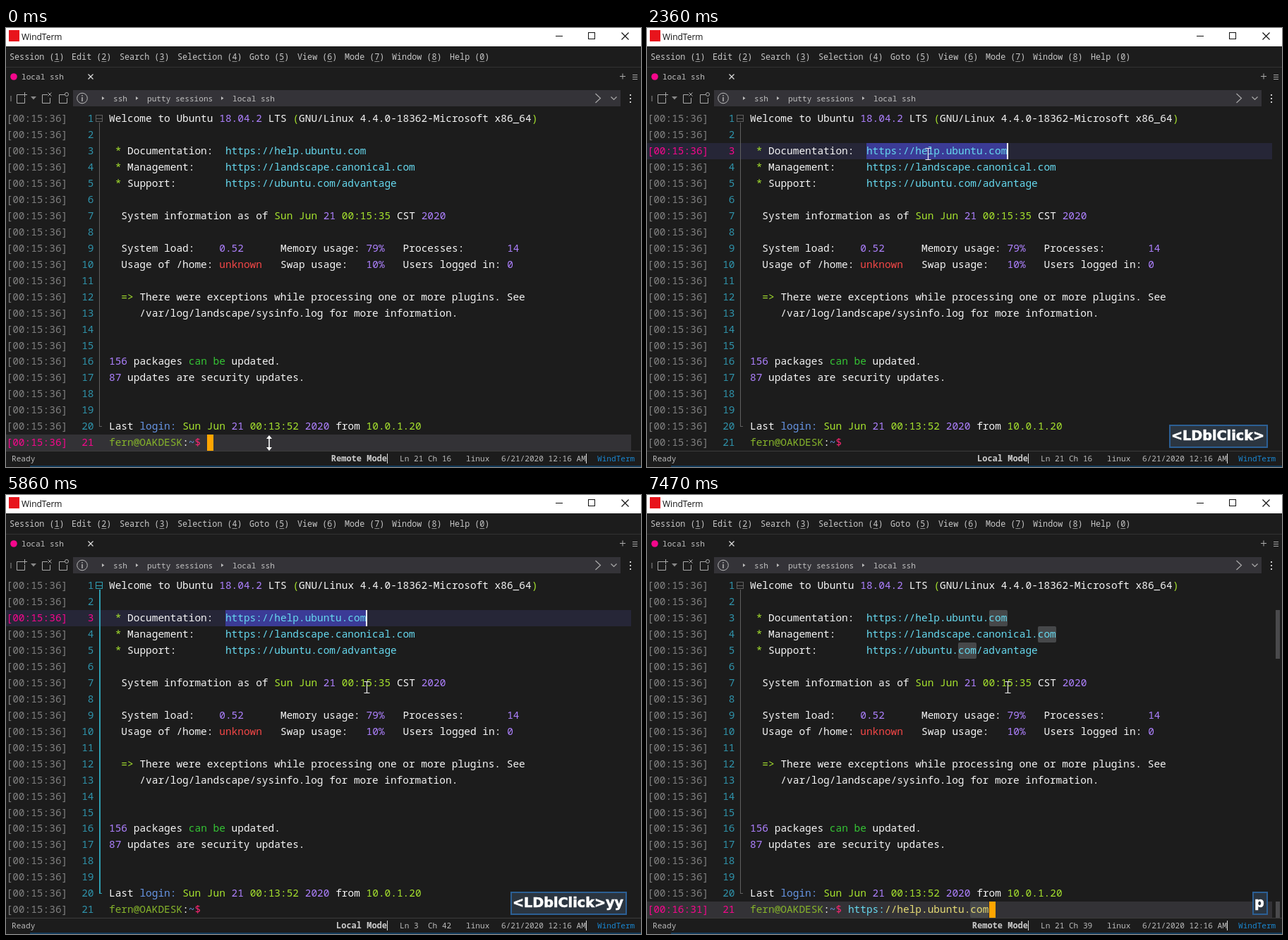
An HTML page with a canvas that plays this animation: 900 px wide and 622 px high, repeating every 8000 ms.

```html
<!DOCTYPE html>
<html lang="en">
<head>
<meta charset="utf-8">
<title>Terminal</title>
<style>
html, body { margin: 0; width: 100%; height: 100%; overflow: hidden; background: #1c1c1c; }
canvas { display: block; }
</style>
</head>
<body>
<canvas id="stage" width="900" height="622"></canvas>
<script>
const ctx = document.getElementById('stage').getContext('2d');
const LOOP = 8000, LEFT = 146, CELL = 8.68, PITCH = 22.94;
const MONO = '"Noto Sans Mono", monospace';
const TERM = `${CELL / 0.6}px ${MONO}`, SMALL = `11.1px ${MONO}`;
const COLORS = {
  w: '#f5f5f5', p: '#ae81ff', g: '#a6e22e', c: '#66d9ef', r: '#f44747',
  k: '#35c435', b: '#6796e6', u: '#86b42b', m: '#f92672', y: '#e6db74'
};
const ACTIVE = '#f5078c';

// {x...} colours a run with key x
const LINES = [
  'Welcome to Ubuntu {p18.04.2} LTS {g(}GNU/Linux 4.4.0-18362-Microsoft x86_64{g)}',
  '',
  ' {g*} Documentation:  {chttps://help.ubuntu.com}',
  ' {g*} Management:     {chttps://landscape.canonical.com}',
  ' {g*} Support:        {chttps://ubuntu.com/advantage}',
  '',
  '  System information as of {gSun Jun} {p21} {g00:15:35} CST {p2020}',
  '',
  '  System load:    {p0.52}      Memory usage: {p79%}   Processes:       {p14}',
  '  Usage of /home: {runknown}   Swap usage:   {p10%}   Users logged in: {p0}',
  '',
  '  {g=>} There were exceptions while processing one or more plugins. See',
  '     /var/log/landscape/sysinfo.log for more information.',
  '', '',
  '{p156} packages {kcan be} updated.',
  '{p87} updates are security updates.',
  '', '',
  'Last {blogin:} {gSun Jun} {p21} {g00:13:52} {p2020} from {g10.0.1.20}',
  '{ufern@OAKDESK}:{b~}{m$} '
];
const PASTED = '{chttps:}{y//help.ubuntu.com}';

const MENU = [['Session', 5], ['Edit', 93], ['Search', 161], ['Selection', 243], ['Goto', 345],
  ['View', 413], ['Mode', 480], ['Window', 547], ['Help', 629]];

// start time, x, y of the pointer
const POINTER = [[0, 373, 588], [1020, 340.5, 204.5], [1370, 315.5, 173.5], [1730, 330.5, 175.5],
  [2030, 398.5, 178.5], [2710, 511.5, 272.5]];
const BLINKS = [[290, 1020], [1370, 2030], [2360, 3050], [3390, 4080], [4750, 5480], [5860, 6490]];

const colX = col => Math.round(LEFT + col * CELL);
const rowY = row => Math.round(117.1 + (row - 1) * PITCH);

function rect(x, y, w, h, color) {
  ctx.fillStyle = color;
  ctx.fillRect(x, y, w, h);
}

function text(str, x, y, color, font, align = 'left') {
  ctx.font = font;
  ctx.fillStyle = color;
  ctx.textAlign = align;
  ctx.fillText(str, x, y);
}

// each path is a flat list of x, y
function lines(color, width, ...paths) {
  ctx.strokeStyle = color;
  ctx.lineWidth = width;
  ctx.beginPath();
  for (const p of paths)
    for (let i = 0; i < p.length; i += 2) ctx[i ? 'lineTo' : 'moveTo'](p[i], p[i + 1]);
  ctx.stroke();
}

function circle(x, y, r, color, filled) {
  ctx.beginPath();
  ctx.arc(x, y, r, 0, 7);
  ctx.fillStyle = ctx.strokeStyle = color;
  ctx.lineWidth = 1;
  filled ? ctx.fill() : ctx.stroke();
}

function triangle(color, ...p) {
  ctx.fillStyle = color;
  ctx.beginPath();
  for (let i = 0; i < 6; i += 2) ctx.lineTo(p[i], p[i + 1]);
  ctx.fill();
}

function cross(x, y, r, color, width = 1) {
  lines(color, width, [x - r, y - r, x + r, y + r], [x - r, y + r, x + r, y - r]);
}

function richLine(str, y) {
  let col = 0;
  str.split(/[{}]/).forEach((part, i) => {
    const run = i % 2 ? part.slice(1) : part;
    text(run, LEFT + col * CELL, y, COLORS[i % 2 ? part[0] : 'w'], TERM);
    col += run.length;
  });
}

function titleBar() {
  rect(0, 0, 900, 26, '#fff');
  rect(4, 3, 15, 16, '#e8141c');
  text('WindTerm', 22, 17, '#111', '12px "Open Sans", sans-serif');
  lines('#111', 1, [779, 11.5, 789, 11.5]);
  ctx.strokeRect(825.5, 6.5, 9, 9);
  cross(877.5, 11.5, 5, '#111', 1.2);
}

function menuBar() {
  const font = `11.75px ${MONO}`;
  MENU.forEach(([name, x], i) => {
    const digit = x + (name.length + 2) * 7.05;
    text(`${name} (${(i + 1) % 9})`, x, 45, '#c8c8c8', font);
    lines('#8a8a8a', 1, [digit, 47.5, digit + 7, 47.5]);
  });
  rect(0, 55, 900, 1, '#333');
}

function tabBar() {
  circle(11, 69, 4.8, ACTIVE, true);
  text('local ssh', 22, 73, '#c0c0c0', SMALL);
  cross(120, 69, 3.5, '#ddd', 1.2);
  lines('#aaa', 1, [870, 68.5, 878, 68.5], [874, 64.5, 874, 72.5],
    [888, 66.5, 895, 66.5], [888, 69.5, 895, 69.5], [888, 72.5, 895, 72.5]);
}

function pageIcon(x) {
  lines('#aaa', 1, [x + 8, 94.5, x + .5, 94.5, x + .5, 106.5, x + 11.5, 106.5, x + 11.5, 99]);
}

function toolBar() {
  rect(95, 88, 776, 23, '#343338');
  rect(6, 96, 2, 8, '#555');
  [15, 51, 75].forEach(pageIcon);
  lines('#aaa', 1, [23, 94.5, 30, 94.5], [26.5, 91, 26.5, 98]);
  triangle('#888', 35, 97, 43, 97, 39, 101.5);
  cross(62, 94, 2.5, '#aaa');
  circle(86, 94, 2.5, '#aaa');
  circle(108, 99.5, 7.3, '#bbb');
  lines('#bbb', 1.4, [108, 98, 108, 104], [108, 95, 108, 96.5]);
  [['ssh', 152], ['putty sessions', 200], ['local ssh', 321]].forEach(([name, x]) => {
    text(name, x, 103.5, '#c0c0c0', SMALL);
    triangle('#bbb', x - 16, 97, x - 16, 102, x - 12.5, 99.5);
  });
  lines('#aaa', 1.2, [835.5, 93, 842.5, 99.5, 835.5, 106], [857.5, 97.5, 861.5, 101.5, 865.5, 97.5]);
  [94, 99, 104].forEach(y => rect(884, y, 2, 2, '#ccc'));
}

function statusBar(s) {
  rect(0, 599, 900, 1, '#3c3c3c');
  text('Ready', 8, 614, '#bbb', SMALL);
  text(s.remote ? 'Remote Mode' : 'Local Mode', 540, 614, '#ccc', `bold 12px ${MONO}`, 'right');
  rect(540, 603, 1, 14, '#ddd');
  text(s.place, 558, 614, '#bbb', SMALL);
  text('linux', 652, 614, '#bbb', SMALL);
  text('6/21/2020 12:16 AM', 702, 614, '#bbb', SMALL);
  rect(822, 603, 1, 14, '#ddd');
  text('WindTerm', 838, 614, '#1a86d0', SMALL);
  rect(34, 620, 866, 2, '#123a5a');
}

function fold(active) {
  const color = active ? '#2f9fb2' : '#606060', x = active ? 133 : 132.5;
  lines(color, 1, [128, 128.5, 136, 128.5], [x, 564.5, 136, 564.5]);
  ctx.strokeRect(127.5, 123.5, 9, 9);
  lines(color, active ? 2 : 1, [x, 134, x, 565]);
}

function wordMark(row, col) {
  ctx.fillStyle = '#46484a';
  ctx.beginPath();
  ctx.roundRect(colX(col), rowY(row), 3 * CELL, 23, 2);
  ctx.fill();
}

function terminal(s) {
  rect(0, rowY(s.row), 886, 23, s.selected ? '#262637' : '#333236');
  if (s.selected) rect(colX(19), rowY(3), colX(42) - colX(19), 23, '#3b3b96');
  if (s.marked) {
    [[3, 39], [4, 47], [5, 34], [21, 36]].forEach(([row, col]) => wordMark(row, col));
    rect(891, 163, 6, 69, '#4a4a4c');
    rect(891, 576, 6, 23, '#4a4a4c');
  }
  fold(s.folded);
  LINES.forEach((line, i) => {
    const row = i + 1, y = Math.round(133.2 + i * 22.95), on = row === s.row;
    const stamp = row === 21 && s.pasted ? '[00:16:31]' : '[00:15:36]';
    text(stamp, 0.5, y, on ? ACTIVE : '#808080', TERM);
    text(row, 124.5, y, on ? ACTIVE : '#2f93ab', TERM, 'right');
    richLine(row === 21 && s.pasted ? line + PASTED : line, y);
  });
  if (s.remote) rect(colX(s.pasted ? 39 : 16), rowY(21), 9, 23, '#ffa500');
  else if (s.caret) rect(colX(s.selected ? 42 : 16) - 1, rowY(s.row), 2, 23, '#fff');
}

function pointer(t) {
  const [start, x, y] = POINTER.findLast(p => t >= p[0]);
  if (start === 0) {
    lines('#fff', 1.6, [x, y - 9, x, y + 9]);
    triangle('#fff', x - 4, y - 6, x + 4, y - 6, x, y - 11);
    triangle('#fff', x - 4, y + 6, x + 4, y + 6, x, y + 11);
    return;
  }
  lines('#f0f0f0', 1.2, [x, y - 8, x, y + 8],
    [x - 4, y - 8, x + 4, y - 8], [x - 4, y + 8, x + 4, y + 8]);
}

function keyBox(str, y, alpha = 1) {
  ctx.font = 'bold 19.2px "DejaVu Sans", sans-serif';
  ctx.wordSpacing = '-3.3px';
  const w = Math.round(ctx.measureText(str).width + 8), x = 880 - w;
  ctx.globalAlpha = alpha;
  rect(x, y, w, 33, '#2b3540');
  ctx.strokeStyle = '#2c5f94';
  ctx.lineWidth = 2;
  ctx.strokeRect(x + 1, y + 1, w - 2, 31);
  text(str, x + 3, y + 22, '#fff', ctx.font);
  ctx.strokeStyle = '#fff';
  ctx.lineWidth = 0.6;
  ctx.strokeText(str, x + 3, y + 22);
  ctx.globalAlpha = 1;
  ctx.wordSpacing = '0px';
}

function keys(t) {
  if (t < 290) return;
  if (t >= 6490) {
    const fade = t < 6840 ? 1 : t < 7130 ? 0.66 : 0.33;
    if (t < 7470) keyBox('<LDblClick>yy', 527, fade);
    keyBox('p', 562);
  } else if (t < 2360) keyBox('<Shift - Enter>', 562);
  else keyBox('<LDblClick>' + (t < 3390 ? '' : t < 3880 ? 'y' : 'yy'), 562);
}

function stateAt(t) {
  const selected = t >= 2360 && t < 6490, pasted = t >= 6490;
  const folded = t >= 2710 && !pasted;
  return {
    selected, pasted, folded,
    row: selected ? 3 : 21,
    remote: t < 290 || pasted,
    marked: t >= 7470,
    caret: BLINKS.some(([on, off]) => t >= on && t < off),
    place: pasted ? 'Ln 21 Ch 39' : folded ? 'Ln 3  Ch 42' : 'Ln 21 Ch 16'
  };
}

function draw() {
  const t = performance.now() % LOOP, s = stateAt(t);
  rect(0, 0, 900, 622, '#1c1c1c');
  titleBar();
  menuBar();
  tabBar();
  toolBar();
  terminal(s);
  statusBar(s);
  keys(t);
  pointer(t);
  requestAnimationFrame(draw);
}
draw();
</script>
</body>
</html>
```
